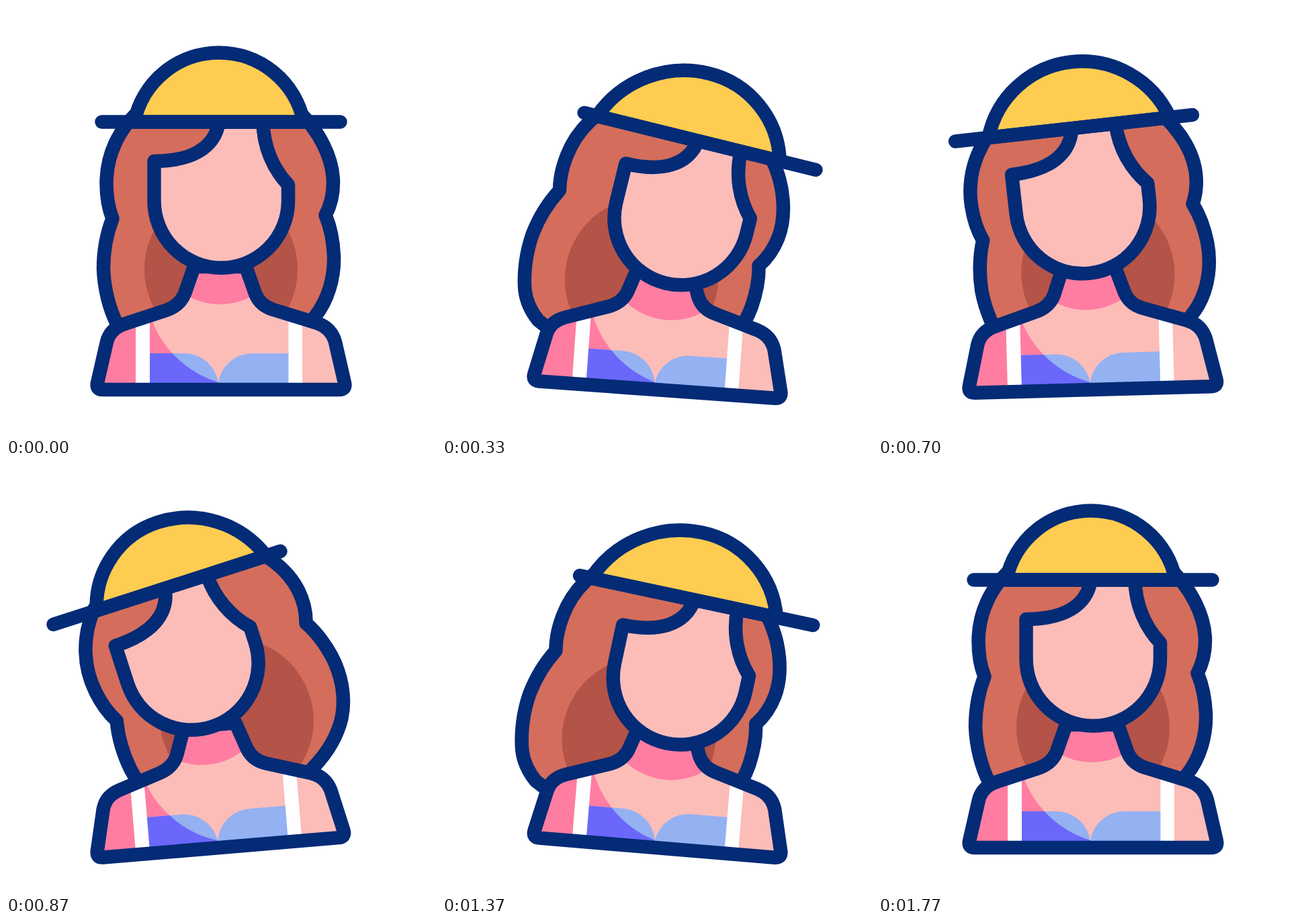
These frames come from a looping animation (640x640 px, 2000 ms). An HTML page:

```html
<!DOCTYPE html>
<html lang="en">
<head>
<meta charset="utf-8">
<title>Woman in a hat</title>
<style>
  html, body { margin: 0; width: 100%; height: 100%; overflow: hidden; background: #fff; }
  svg { display: block; width: 100%; height: 100%; }
  .line { stroke: #042b76; stroke-width: 20.5; stroke-linecap: round; stroke-linejoin: round; }
</style>
</head>
<body>
<svg viewBox="0 0 640 640">
  <defs>
    <path id="torso" d="M144 571 Q134 571 136 561 L150 500 Q155 480 177 473 L238 453 Q259 446 266 428
      L280 388 H357 L371 428 Q378 446 398 452 L463 472 Q484 479 490 500 L504 561 Q506 571 496 571 Z"/>
    <path id="cups" d="M205 517 H265 A51 51 0 0 1 316 561 A51 51 0 0 1 367 517 H430 V567 H205 Z"/>
    <clipPath id="torsoClip"><use class="body" href="#torso"/></clipPath>
    <clipPath id="shadeClip"><path d="M120 580 V465 H216 A155 155 0 0 0 316 560 V580 Z"/></clipPath>
    <clipPath id="hairClip"><use href="#hairShape"/></clipPath>
    <path id="hairShape" d="M203 152 C166 183 149.500 224 149.500 264 C149.500 284 152 300 158.500 316.500
      C149 341 145 366 145 391 C146 421 154 451 165 473 Q176 494 200 508 L240 520 H360 L392 508
      Q435 492 460 462 C479 438 489 405 488 372 C487 350 483 329 475.500 311.500
      C483 297 487 281 487 263 C487 228 467 184 430 152 Z"/>
  </defs>

  <g class="head"><g id="hair">
    <use href="#hairShape" fill="#d46d5c"/>
    <ellipse cx="320" cy="392" rx="114" ry="119" fill="#b45347" clip-path="url(#hairClip)"/>
    <use href="#hairShape" class="line" fill="none"/>
  </g></g>

  <g class="body">
    <use href="#torso" fill="#fcbdb9"/>
    <g clip-path="url(#shadeClip)"><use href="#torso" fill="#ff7da1"/></g>
    <use href="#cups" fill="#94b1f2"/>
    <use href="#cups" fill="#6a67fa" clip-path="url(#shadeClip)"/>
    <path d="M193 468 H214 V567 H193 Z M420.500 468 H441 V567 H420.500 Z" fill="#fff"/>
  </g>
  <g clip-path="url(#torsoClip)">
    <circle class="head" cx="318.500" cy="345" r="99" fill="#ff7da1"/>
  </g>
  <use class="body line" href="#torso" fill="none"/>

  <g class="head">
    <path class="line" fill="#fcbdb9" d="M220.500 231 V290 A99.750 99.750 0 0 0 420 290 V266
      C398 243 383 210 382.500 172 H317 C311 212 275 231 220.500 231 Z"/>
    <path id="dome" class="line" fill="#fecc50"/>
    <path class="line" d="M142.500 172.500 H497.500"/>
  </g>
</svg>
<script>
  const LOOP = 2000;
  // The figure rests, sways right, left, right, and returns to rest.
  const beats = [0, 430, 880, 1320, 1767];
  const sway = {
    body: [4.7, -4.8, 4.9],
    head: [15.8, -17.9, 12.4],
    headX: [0.7, 1, 3.5],
    headY: [24.3, -1, 25.5],
    hair: [8.9, -8.5, 9.3],
    domeLeft: [-33, 19, -32],
    domeRight: [-1, 32, -1],
    domeX: [-9, 20, -10],
    domeTop: [2, 6, 2.5]
  };
  const hair = document.getElementById('hair');
  const dome = document.getElementById('dome');

  function valueAt(name, time) {
    const poses = [0, ...sway[name], 0];
    if (time >= beats[4]) return 0;
    const i = beats.findIndex((beat, n) => time < beats[n + 1]);
    const part = (time - beats[i]) / (beats[i + 1] - beats[i]);
    const eased = (1 - Math.cos(Math.PI * part)) / 2;
    return poses[i] + (poses[i + 1] - poses[i]) * eased;
  }

  function setAll(selector, transform) {
    for (const el of document.querySelectorAll(selector)) el.setAttribute('transform', transform);
  }

  // Two circular arcs that meet level at the crown.
  function domePath(left, crown, right, height) {
    const base = 172.5;
    const radius = half => (half * half + height * height) / (2 * height);
    const arcTo = (half, x, y) => `A${radius(half)} ${radius(half)} 0 0 1 ${x} ${y}`;
    return `M${left} ${base} ${arcTo(crown - left, crown, base - height)} ${arcTo(right - crown, right, base)} Z`;
  }

  function draw(time) {
    const at = name => valueAt(name, time);
    setAll('.body', `rotate(${at('body')} 318 571)`);
    setAll('.head', `translate(${at('headX')} ${at('headY')}) rotate(${at('head')} 320 438)`);
    hair.setAttribute('transform', `rotate(${at('hair')} 317 128)`);
    dome.setAttribute('d', domePath(
      191 + at('domeLeft'), 317 + at('domeX'), 443 + at('domeRight'), 103 - at('domeTop')));
  }

  function tick() {
    draw(performance.now() % LOOP);
    requestAnimationFrame(tick);
  }
  tick();
</script>
</body>
</html>
```
